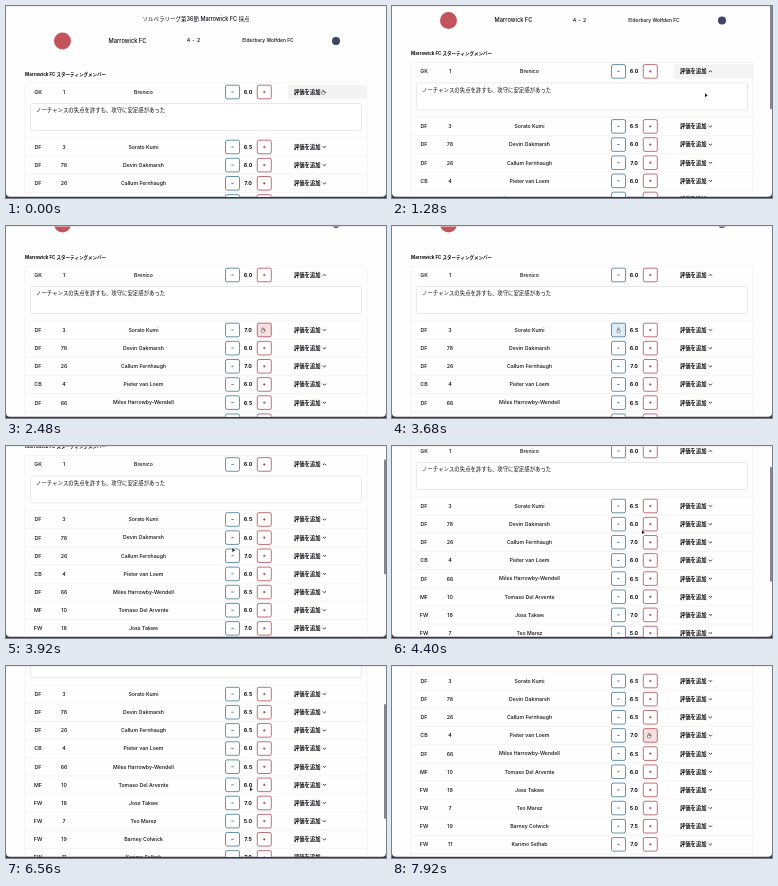
An HTML page with a canvas that plays this animation: 380 px wide and 192 px high, repeating every 8 s.

```html
<!DOCTYPE html>
<html lang="ja">
<head>
<meta charset="utf-8">
<title>採点</title>
<style>
html, body { margin: 0; width: 100%; height: 100%; overflow: hidden; background: #fff; }
canvas { display: block; width: 380px; height: 192px; }
</style>
</head>
<body>
<canvas id="stage"></canvas>
<script>
const W = 380, H = 192, LOOP = 8000;
const canvas = document.getElementById('stage');
const g = canvas.getContext('2d');
const dpr = Math.max(1, window.devicePixelRatio || 1);
canvas.width = W * dpr;
canvas.height = H * dpr;

const FONT = 'Inter, "Noto Sans CJK JP", "Noto Sans CJK", sans-serif';
const INK = '#0c0d12', LINE = '#f1f1f2', BLUE = '#2a6584', RED = '#a5333d';
const HOME = 'Marrowick FC', AWAY = 'Elderbury Wolfden FC';
const MINUS_X = 226.5, PLUS_X = 258.3;

const players = [
  ['GK', 1, 'Brenico', 6],
  ['DF', 3, 'Sorato Kumi', 6.5],
  ['DF', 78, 'Devin Oakmarsh', 6],
  ['DF', 26, 'Callum Fernhaugh', 7],
  ['CB', 4, 'Pieter van Loem', 6],
  ['DF', 66, 'Miles Harrowby-Wendell', 6.5],
  ['MF', 10, 'Tomaso Del Arvente', 6],
  ['FW', 18, 'Joss Takwe', 7],
  ['FW', 7, 'Teo Marez', 5],
  ['FW', 19, 'Barney Colwick', 7.5],
  ['FW', 11, 'Karimo Selhab', 7]
];

const clamp = v => Math.min(1, Math.max(0, v));
const smooth = v => v * v * (3 - 2 * v);
const rowY = i => i ? 141 + (i - 1) * 18.15 : 86;

// each scroll slows down towards its resting place
const scrolls = [
  { from: 920, to: 1760, by: 37 },
  { from: 3720, to: 4080, by: 44 },
  { from: 6240, to: 6800, by: 45 }
];
const scrollAt = t => scrolls.reduce((y, s) =>
  y + s.by * (1 - Math.pow(1 - clamp((t - s.from) / (s.to - s.from)), 1.45)), 0);

// the pointer visits a button, and clicks it shortly after arriving
const visit = (row, side, from, to) => ({
  row, side, from, to,
  x: side > 0 ? PLUS_X - 1.5 : MINUS_X,
  y: rowY(row) - scrollAt(from)
});
const rest = (from, to, x, y) => ({ from, to, x, y });
const stops = [
  rest(0, 80, 317, 86),
  rest(320, 1360, 313, 89),
  rest(1760, 1960, 262, 78),
  visit(1, 1, 2240, 2880),
  visit(1, -1, 3280, 3720),
  rest(4200, 4200, 226, 104),
  rest(4400, 4400, 250, 86),
  visit(2, 1, 4720, 5120),
  visit(3, -1, 5500, 5920),
  rest(6160, 6840, 244, 123),
  visit(4, 1, 7080, 7400),
  visit(4, 1, 7560, LOOP)
];
const visits = stops.filter(s => s.side);
const isOver = (v, t) => t >= v.from - 60 && t < v.to + 60;

function cursorAt(t) {
  const i = stops.findLastIndex(s => t >= s.from);
  const a = stops[i], b = stops[i + 1];
  if (t <= a.to || !b) return a;
  const k = smooth((t - a.to) / (b.from - a.to));
  return { x: a.x + (b.x - a.x) * k, y: a.y + (b.y - a.y) * k };
}

const ratingAt = (row, t) => visits.reduce((r, v) =>
  v.row === row && t >= v.from + 100 ? r + v.side / 2 : r, players[row][3]);

function text(s, x, y, size, weight = 450, align = 'center') {
  g.font = `${weight} ${size}px ${FONT}`;
  g.textAlign = align;
  g.textBaseline = 'alphabetic';
  g.fillStyle = INK;
  g.fillText(s, x, y + size * 0.36);
}

function box(x, y, w, h, r, stroke, fill, lw = 0.7) {
  g.beginPath();
  g.roundRect(x, y, w, h, r);
  if (fill) { g.fillStyle = fill; g.fill(); }
  if (stroke) { g.strokeStyle = stroke; g.lineWidth = lw; g.stroke(); }
}

function line(points, color, lw = 0.7) {
  g.beginPath();
  points.forEach(([x, y]) => g.lineTo(x, y));
  g.strokeStyle = color;
  g.lineWidth = lw;
  g.stroke();
}

function dot(x, y, r, color) {
  g.beginPath();
  g.arc(x, y, r, 0, Math.PI * 2);
  g.fillStyle = color;
  g.fill();
}

function button(x, y, side, over) {
  const color = side > 0 ? RED : BLUE;
  const tint = side > 0 ? '#f6dfe1' : '#dcedf5';
  box(x - 7, y - 6.8, 14, 13.6, 1.6, color, over ? tint : '#fff');
  line([[x - 1.2, y], [x + 1.2, y]], color, 0.8);
  if (side > 0) line([[x, y - 1.2], [x, y + 1.2]], color, 0.8);
}

function row(i, t) {
  const [pos, num, name] = players[i];
  const y = rowY(i);
  const over = side => visits.some(v => v.row === i && v.side === side && isOver(v, t));
  if (!i && t < scrolls[0].to) box(282, y - 7, 79, 14, 1, null, '#f3f3f4');
  text(pos, 32, y, 5.3);
  text(num, 58, y, 5.3);
  text(name, 137.5, y, 5.2);
  button(MINUS_X, y, -1, over(-1));
  text(ratingAt(i, t).toFixed(1), 242, y, 5.4, 650);
  button(PLUS_X, y, 1, over(1));
  text('評価を追加', 288, y, 5.3, 600, 'left');
  const d = i ? 0.8 : -0.8;
  line([[316.8, y - d], [318.4, y + d], [320, y - d]], INK, 0.8);
  if (i) line([[19, y + 9.1], [361, y + 9.1]], LINE);
}

function page(t) {
  text(`ソルベラリーグ第36節 ${HOME} 採点`, 190, 13, 5.5, 500);
  dot(56.5, 35, 8.5, '#c4545c');
  text(HOME, 121.5, 34.5, 5.7, 550);
  text('4', 182.5, 34.5, 5.2);
  text('-', 187.5, 34.5, 5.2);
  text('2', 192.5, 34.5, 5.2);
  text(AWAY, 262, 34.5, 4.9, 550);
  dot(330, 35, 4, '#3d4465');
  text(`${HOME} スターティングメンバー`, 19, 68, 4.5, 650, 'left');

  box(19, 77, 342, 240, 1.5, LINE);
  box(24.5, 97.5, 331, 27, 2, '#e0e1e5', '#fff');
  text('ノーチャンスの失点を許すも、攻守に安定感があった', 30, 104.5, 5.4, 450, 'left');
  line([[19, 131.9], [361, 131.9]], LINE);
  players.forEach((_, i) => row(i, t));
}

// shows while scrolling, then fades
function thumb(t, top) {
  const alpha = Math.max(...scrolls.map(s =>
    Math.min(clamp((t - s.from) / 80), clamp((s.to + 560 - t) / 240))));
  g.globalAlpha = alpha;
  box(378, top, 2, 115, 1, null, '#858587');
  g.globalAlpha = 1;
}

function pointer(x, y) {
  g.beginPath();
  [[0, -2], [0, 2], [1.2, 1.2], [2.8, 1]].forEach(([dx, dy]) => g.lineTo(x + dx, y + dy));
  g.closePath();
  g.strokeStyle = '#fff';
  g.lineWidth = 0.6;
  g.stroke();
  g.fillStyle = '#111';
  g.fill();
}

function hand(x, y) {
  box(x - 0.6, y - 2.2, 1.2, 3.4, 0.6, '#333', '#fff', 0.5);
  box(x - 1.4, y - 0.2, 3.2, 2.6, 0.9, '#333', '#fff', 0.5);
}

function draw(t) {
  const s = scrollAt(t);
  g.setTransform(dpr, 0, 0, dpr, 0, 0);
  g.fillStyle = '#3a3a3c';
  g.fillRect(0, 0, W, H);
  g.save();
  g.beginPath();
  g.roundRect(0, -10, W, 200.8, 4);
  g.clip();
  g.fillStyle = '#fefefe';
  g.fillRect(0, 0, W, H);
  g.save();
  g.translate(0, -s);
  page(t);
  g.restore();
  g.fillStyle = '#e2e2e4';
  g.fillRect(0, 0, W, 0.6);
  thumb(t, -23 + 0.54 * s);
  g.restore();
  const { x, y } = cursorAt(t);
  const pointing = t < 200 || visits.some(v => isOver(v, t));
  (pointing ? hand : pointer)(x, y);
}

const begin = performance.now();
function tick() {
  draw(Math.max(0, performance.now() - begin) % LOOP);
  requestAnimationFrame(tick);
}
tick();
</script>
</body>
</html>
```
